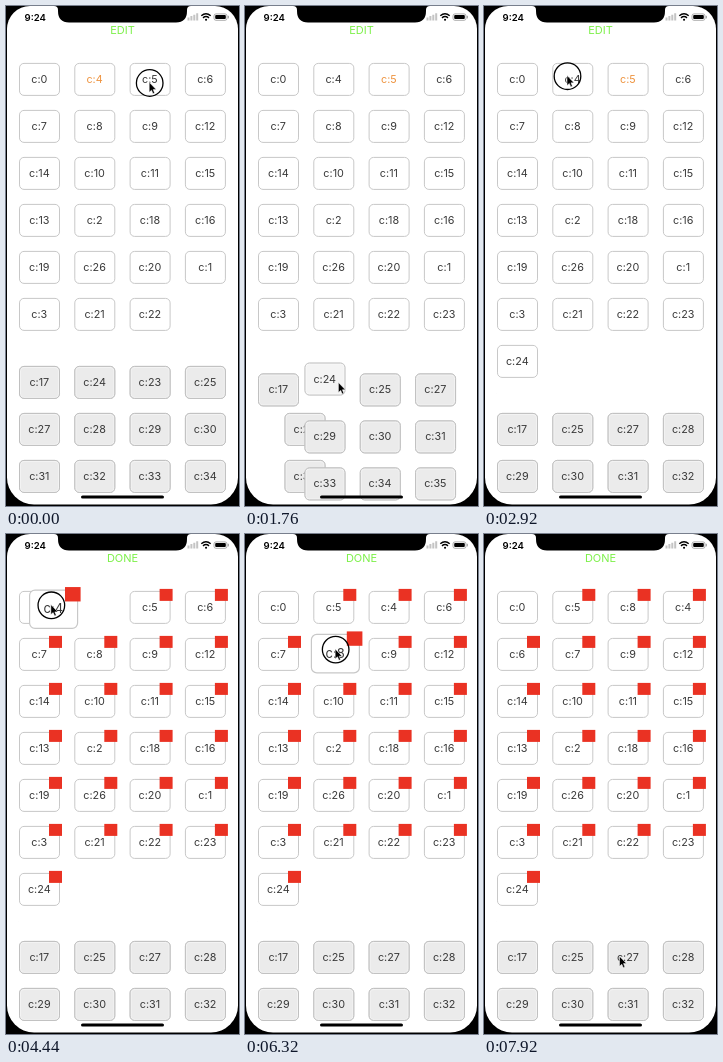
These frames come from a looping animation (233x500 px, 8 s). An HTML page:

```html
<!DOCTYPE html>
<html lang="en">
<head>
<meta charset="utf-8">
<title>Editable grid</title>
<style>
  html, body { margin: 0; width: 100%; height: 100%; overflow: hidden; background: #000; }
  body { font-family: Inter, Roboto, sans-serif; }
  #stage { position: absolute; left: 0; top: 0; width: 233px; height: 500px; overflow: hidden; background: #000; }
  #cells { position: absolute; inset: 0; background: #fff; clip-path: inset(0 1px 1.5px 1px round 23px 23px 27px 27px); }
  #mode { position: absolute; left: 0; top: 16.8px; width: 233px; font-size: 11px; line-height: 14px; text-align: center; color: #7df04a; }
  .cell {
    position: absolute; left: 0; top: 0; width: 40.6px; height: 32.7px; box-sizing: border-box;
    border: 1px solid #c8c8c8; border-radius: 5px; background: #fff; color: #3a3a3a;
    font-size: 10.8px; line-height: 31.2px; text-align: center;
  }
  .gray { position: absolute; inset: -1px; border: 1px solid #c0c0c0; border-radius: 5px; background: #ebebeb; box-shadow: inset 0 0 0 1px #f3f3f3; }
  .label { position: relative; }
  .badge { position: absolute; left: 29.3px; top: -3.3px; width: 12.6px; height: 12.6px; background: #ea3223; }
  svg { position: absolute; left: 0; top: 0; }
</style>
</head>
<body>
<div id="stage">
  <div id="cells"><div id="mode"></div></div>
  <svg width="233" height="500" viewBox="0 0 233 500">
    <path d="M48 0Q52 0 52 4V5Q52 16.4 63 16.4H170Q181 16.4 181 5V4Q181 0 185 0Z"/>
    <text x="18.6" y="14.6" font-size="9.6" font-weight="600">9:24</text>
    <path id="signal" fill="none" stroke="#c4c4c4" stroke-width="2"/>
    <g fill="none" stroke="#000" stroke-width="1.5">
      <path d="M195.3 9.8Q200 5.8 204.7 9.8M197 11.8Q200 9.3 203 11.8"/>
      <path d="M200 13.8l.1 0" stroke-width="2" stroke-linecap="round"/>
    </g>
    <rect x="208" y="7.9" width="13" height="6.4" rx="2" fill="none" stroke="#999" stroke-width=".8"/>
    <rect x="209.2" y="9.1" width="10.6" height="4" rx="1"/>
    <path d="M222.3 9.8v2.6" stroke="#999"/>
    <rect x="75" y="489.4" width="83" height="3.2" rx="1.6"/>
    <g id="pointer">
      <circle id="ring" cx=".5" cy=".7" r="13.3" fill="none" stroke="#000" stroke-width="1.3"/>
      <path d="M0 0V10L2.3 7.9L3.8 11.4L5.4 10.7L4 7.3H7Z" stroke="#fff" stroke-width=".5"/>
    </g>
  </svg>
</div>
<script>
const LOOP = 8000, SELECT_AT = 80, EDIT_AT = 3480;
const MOVE = 320, LIFT = 200, TAP = 120, LONG_PRESS = 560;
const COLUMNS = 4, STEP_X = 55.3, STEP_Y = 47, LEFT = 13, TOP = 56.9, SECTION_GAP = 21;
const WIDTH = 40.6, HEIGHT = 32.7;

const $ = id => document.getElementById(id);
const mix = (a, b, p) => a + (b - a) * p;
const clamp = v => Math.min(1, Math.max(0, v));
const ease = v => { const p = clamp(v); return p * p * (3 - 2 * p); };
const range = (a, b) => Array.from({ length: b - a + 1 }, (_, i) => a + i);

const firstTop = [0, ...range(4, 9), 12, 14, 10, 11, 15, 13, 2, 18, 16, 19, 26, 20, 1, 3, 21, 22];
const firstBottom = [17, 24, 23, 25, ...range(27, 36)];

// A tap appends a cell to the upper section; a drag inserts it at a new index.
const taps = [{ id: 23, at: 1000 }, { id: 24, at: 1680 }];
const drags = [
  { id: 4, lift: EDIT_AT, at: 4700, drop: 5080, to: 2, dx: 2.5 },
  { id: 8, lift: 6120, at: 6460, drop: 7080, to: 2, dx: 0 }
];
const presses = [
  { on: 0, off: SELECT_AT },
  ...taps.map(({ at }) => ({ on: at - TAP, off: at })),
  ...drags.map(({ lift, drop }) => ({ on: lift - LONG_PRESS, off: drop }))
];

// The pointer rests between glides.
const home = { x: 143.2, y: 76.3 };
const glides = [
  { from: 80, until: 880, x: 139, y: 390 },
  { from: 1080, until: 1400, x: 93.4, y: 376.5 },
  { from: 1960, until: 2360, x: 41, y: 128 },
  { from: 2360, until: 2560, x: 56, y: 70 },
  { from: 2680, until: 2900, x: 83, y: 69.5 },
  { from: 3840, until: 4080, x: 43.3, y: 70.5 },
  { from: 4400, until: 5020, x: 167, y: 77 },
  { from: 5080, until: 5400, x: 89, y: 115.5 },
  { from: 6280, until: 6800, x: 154.7, y: 82.5 },
  { from: 7080, until: 7920, x: 135.5, y: 422.3 }
];

function cursor(t) {
  return glides.reduce((at, { from, until, x, y }) => {
    const p = ease((t - from) / (until - from));
    return { x: mix(at.x, x, p), y: mix(at.y, y, p) };
  }, home);
}

function layout(at, top, bottom) {
  const slots = {};
  const put = (ids, y, gray) => ids.forEach((id, i) => {
    slots[id] = { x: LEFT + STEP_X * (i % COLUMNS), y: y + STEP_Y * Math.floor(i / COLUMNS), gray };
  });
  put(top, TOP, 0);
  put(bottom, TOP + SECTION_GAP + STEP_Y * Math.ceil(top.length / COLUMNS), 1);
  return { at, top, bottom, slots };
}

const layouts = [layout(0, firstTop, firstBottom)];
for (const { id, at, to = Infinity } of [...taps, ...drags]) {
  const last = layouts.at(-1);
  const top = last.top.filter(n => n !== id);
  top.splice(to, 0, id);
  layouts.push(layout(at, top, last.bottom.filter(n => n !== id)));
}

const add = (parent, name, text = "") => {
  const el = document.createElement("div");
  el.className = name;
  el.textContent = text;
  return parent.appendChild(el);
};
const cells = [...firstTop, ...firstBottom].map(id => {
  const el = add($("cells"), "cell");
  const drag = drags.find(d => d.id === id);
  return { id, drag, el, gray: add(el, "gray"), label: add(el, "label", "c:" + id), badge: add(el, "badge") };
});
$("signal").setAttribute("d", range(0, 3).map(i => `M${182.5 + 2.9 * i} 14.5v${-3 - 1.4 * i}`).join(""));

function draw(t) {
  const now = layouts.findLast(l => l.at <= t);
  const before = layouts[Math.max(0, layouts.indexOf(now) - 1)];
  const p = ease((t - now.at) / MOVE);
  const editing = t >= EDIT_AT;
  const selected = editing ? null : t < SELECT_AT ? 4 : 5;

  for (const { id, drag, el, gray, label, badge } of cells) {
    const a = before.slots[id], b = now.slots[id];
    let x = mix(a.x, b.x, p), y = mix(a.y, b.y, p), held = 0;
    if (drag) {
      held = ease((t - drag.lift) / LIFT) * (1 - ease((t - drag.drop) / MOVE));
      const grip = cursor(Math.min(t, drag.drop));
      x = mix(x, grip.x + drag.dx - WIDTH / 2, held);
      y = mix(y, grip.y + 4.5 - HEIGHT / 2, held);
    }
    el.style.transform = `translate(${x}px, ${y}px) scale(${1 + 0.2 * held})`;
    el.style.zIndex = held > 0 ? 3 : a.gray !== b.gray && p < 1 ? 2 : 1;
    gray.style.opacity = mix(a.gray, b.gray, clamp(p * 3));
    label.style.color = id === selected ? "#ee9440" : "";
    badge.style.display = editing && id !== 0 && !b.gray ? "" : "none";
  }

  const { x, y } = cursor(t);
  $("mode").textContent = editing ? "DONE" : "EDIT";
  $("pointer").setAttribute("transform", `translate(${x} ${y})`);
  $("ring").style.display = presses.some(({ on, off }) => t >= on && t < off) ? "" : "none";
}

const origin = performance.now();
function tick() {
  draw((performance.now() - origin) % LOOP);
  requestAnimationFrame(tick);
}
tick();
</script>
</body>
</html>
```
